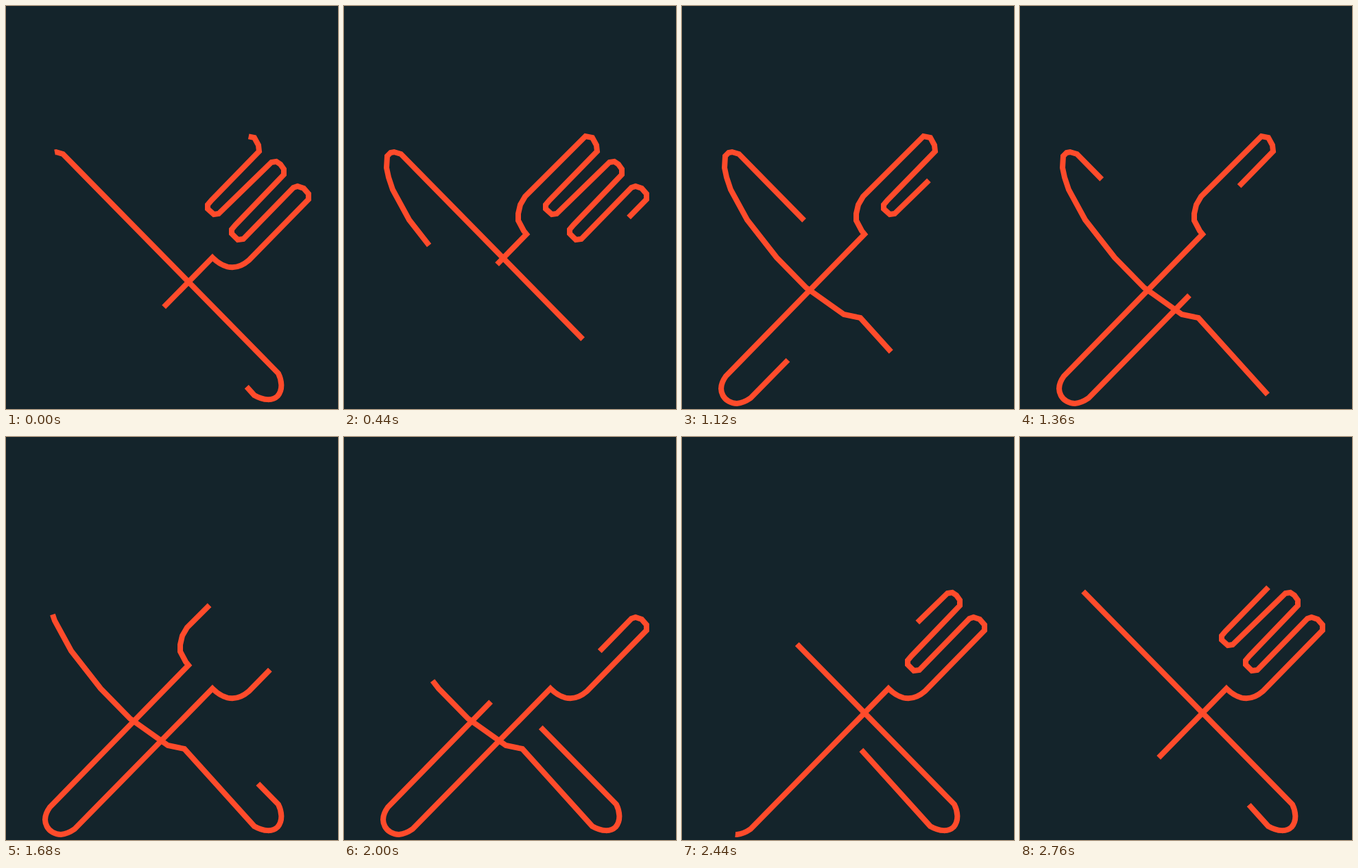
Animation of 484 by 588 pixels, one loop 2.8 s. Source, as an HTML page:

```html
<!DOCTYPE html>
<html lang="en">
<head>
<meta charset="utf-8">
<title>Knife and fork</title>
<style>
  html, body { margin: 0; width: 100%; height: 100%; overflow: hidden; background: #14242b; }
  svg { display: block; width: 484px; height: 588px; }
  path {
    fill: none;
    stroke: #ff4b2b;
    stroke-width: 8;
    stroke-dasharray: 539 3000;
    animation: trace 2800ms linear infinite;
  }
  #fork { --start: -344px; }
  #knife { --start: -352px; }

  /* One lap of an outline is 1000 units */
  @keyframes trace {
    0% { stroke-dashoffset: var(--start); }
    15.714% { stroke-dashoffset: calc(var(--start) - 155px); }
    31.428% { stroke-dashoffset: calc(var(--start) - 311px); }
    48.571% { stroke-dashoffset: calc(var(--start) - 476px); }
    71.428% { stroke-dashoffset: calc(var(--start) - 702px); }
    87.142% { stroke-dashoffset: calc(var(--start) - 869px); }
    98.571% { stroke-dashoffset: calc(var(--start) - 975px); }
    100% { stroke-dashoffset: calc(var(--start) - 989px); }
  }
</style>
</head>
<body>
<svg viewBox="0 0 484 588">
  <path id="knife" pathLength="2000"/>
  <path id="fork" pathLength="2000"/>
</svg>
<script>
  const outlines = {
    knife: `95 312 L138 367 181 411 236 450 260 455 362 568
      C376 576 389 576 396 569 C404 560 402 546 397 536
      L83 216 73 213 68 214 63 219 62 236 65 250 71 268`,
    fork: `266 333 L64 540 C48 562 63 580 80 580 Q90 579 100 572
      L301 367 C311 377 331 391 354 371
      L441 282 441 274 434 266 425 263 419 265
      L346 340 338 341 329 332 329 326 335 319
      L405 246 405 238 400 231 394 227 387 228
      L310 303 303 304 294 296 294 290 300 283
      L369 212 368 203 362 192 352 190
      L264 278 257 290 254 303 254 313 262 328`
  };

  // Two laps, so the moving dash never crosses the path's ends
  for (const [id, d] of Object.entries(outlines)) {
    document.getElementById(id).setAttribute('d', `M${d} L${d} Z`);
  }
</script>
</body>
</html>
```
